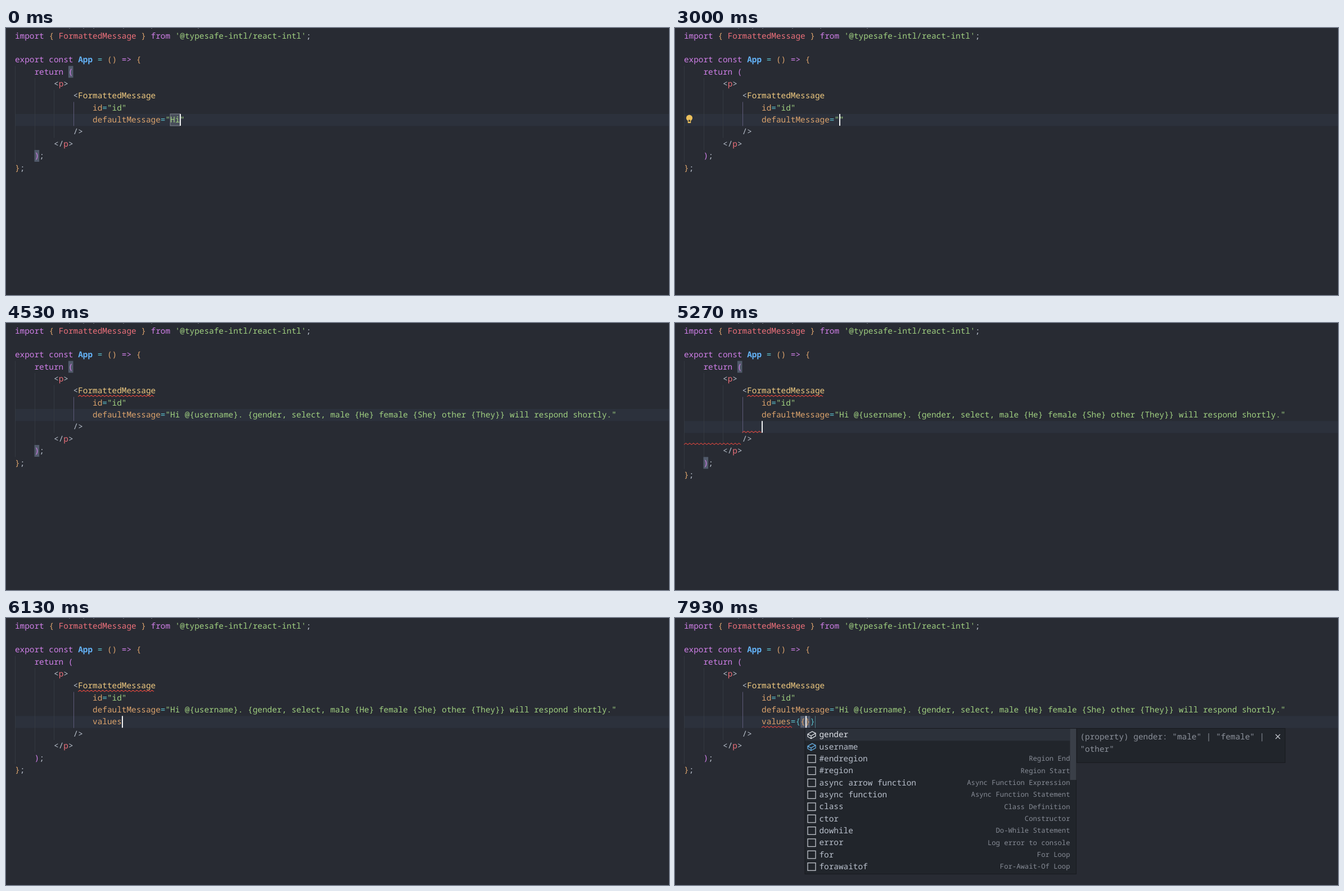
Animation, 1179 px wide and 475 px high, one loop 8 s. Source, as an HTML page:

```html
<!DOCTYPE html>
<html lang="en">
<head>
<meta charset="utf-8">
<title>Typed messages in the editor</title>
<style>
  html, body { margin: 0; width: 100%; height: 100%; overflow: hidden; background: #282b33; }
  svg { display: block; width: 1179px; height: 475px; }
  text {
    font: 500 14.38px "Noto Sans Mono", "DejaVu Sans Mono", monospace;
    white-space: pre;
    text-rendering: geometricPrecision;
    fill: #b9c0cc;
  }
  .keyword { fill: #d07fe8; }
  .red { fill: #ec707a; }
  .orange { fill: #dca36c; }
  .green { fill: #a0d080; }
  .teal { fill: #5bbfcb; }
  .tag { fill: #f0ca80; }
  .func { fill: #64b3f8; font-weight: bold; }
  .bright { fill: #dfe2e8; }
  .detail { fill: #868b95; font-size: 12.22px; text-anchor: end; }
  .doc { fill: #8c919b; }
  .squiggle { fill: none; stroke: #cc443d; stroke-width: 1.1; }
  .icon { fill: none; stroke: #c3c7ce; stroke-width: 1.3; }
  .field { stroke: #64a9dc; }
  .active { stroke: #e4e7ec; }
</style>
</head>
<body>
<svg id="stage" viewBox="0 0 1179 475"></svg>
<script>
const LOOP = 8000, LEFT = 16, TOP = 3.4, CHAR = 8.628, LINE = 21.36, BASE = 15.2;
const MESSAGE = 'Hi @{username}. {gender, select, male {He} female {She} other {They}} will respond shortly.';
const END = 33 + MESSAGE.length;
const TAG_ERROR = [5, 13, 29];

const SNIPPETS = [
  ['#endregion', 'Region End'],
  ['#region', 'Region Start'],
  ['async arrow function', 'Async Function Expression'],
  ['async function', 'Async Function Statement'],
  ['class', 'Class Definition'],
  ['ctor', 'Constructor'],
  ['dowhile', 'Do-While Statement'],
  ['error', 'Log error to console'],
  ['for', 'For Loop'],
  ['forawaitof', 'For-Await-Of Loop'],
];
const PROPS = {
  x: 153.5, thumb: 86, fields: ['values', 'description?', 'key?', 'tagName?'],
  doc: ['(property) values: {', '    username: string;', '} & {',
        '    gender: "male" | "female" | "other…', '}'],
};
const VALUES = {
  x: 231, thumb: 91, fields: ['gender', 'username'],
  doc: ['(property) gender: "male" | "female" |', '"other"'],
};

// Each step changes part of the editor state at the given time.
const steps = [
  [0, { message: 'Hi', values: null, caret: [7, 34], on: true, word: 'match', outer: true,
        inner: false, bulb: false, errors: [], popup: null, doc: false }],
  [470, { on: false }],
  [1000, { on: true }],
  [1470, { on: false }],
  [1600, { caret: [7, 32], on: true, word: 'selected', outer: false }],
  [1870, { bulb: true }],
  [2070, { message: '', word: null }],
  [2530, { on: false }],
  [3000, { on: true }],
  [3200, { message: MESSAGE, caret: [7, END - 1], bulb: false }],
  [3730, { on: false }],
  [4030, { caret: [7, END], on: true, outer: true }],
  [4130, { errors: [TAG_ERROR] }],
  [4530, { on: false }],
  [4930, { values: '', caret: [8, 16], on: true }],
  [5200, { errors: [TAG_ERROR, [8, 12, 16], [9, 0, 12]] }],
  [5400, { popup: PROPS }],
  [5430, { on: false }],
  [5530, { doc: true }],
  [5930, { on: true }],
  [6070, { values: 'values', caret: [8, 22], popup: null, doc: false, outer: false, errors: [TAG_ERROR] }],
  [6470, { values: 'values=', caret: [8, 23] }],
  [6600, { values: 'values={}', caret: [8, 24], inner: true }],
  [6730, { values: 'values={{}}', caret: [8, 25] }],
  [6800, { errors: [[8, 23, 27]] }],
  [7200, { on: false, errors: [[8, 16, 22]] }],
  [7730, { on: true }],
  [7870, { popup: VALUES }],
  [7930, { doc: true }],
];
const states = [];
for (const [, change] of steps) states.push({ ...states.at(-1), ...change });

const colX = col => LEFT + col * CHAR;
const rowY = row => TOP + row * LINE;
const escape = s => s.replace(/&/g, '&amp;').replace(/</g, '&lt;');
const rect = (x, y, w, h, fill, extra = '') =>
  `<rect x="${x}" y="${y}" width="${w}" height="${h}" fill="${fill}" ${extra}/>`;
const text = (x, y, s, cls = '') => `<text x="${x}" y="${y}" class="${cls}">${escape(s)}</text>`;
const cell = (row, col, n, fill, extra) => rect(colX(col), rowY(row), n * CHAR, LINE - .4, fill, extra);
const mark = (row, col) => cell(row, col, 1, '#515a6b');

// A line is an indent followed by pairs of class and text.
function codeLine(row, [col, ...parts]) {
  let out = '';
  for (let i = 0; i < parts.length; i += 2) {
    out += text(colX(col), rowY(row) + BASE, parts[i + 1], parts[i]);
    col += parts[i + 1].length;
  }
  return out;
}

function codeLines({ message, values }) {
  const lines = [
    [0, 'keyword', 'import ', 'orange', '{ ', 'red', 'FormattedMessage', 'orange', ' } ',
      'keyword', 'from ', 'green', "'@typesafe-intl/react-intl'", '', ';'],
    [0],
    [0, 'keyword', 'export const ', 'func', 'App', 'teal', ' = ', 'orange', '() ',
      'keyword', '=> ', 'orange', '{'],
    [4, 'keyword', 'return ('],
    [8, '', '<', 'red', 'p', '', '>'],
    [12, '', '<', 'tag', 'FormattedMessage'],
    [16, 'orange', 'id', 'teal', '=', 'green', '"id"'],
    [16, 'orange', 'defaultMessage', 'teal', '=', 'green', `"${message}"`],
    [12, '', '/>'],
    [8, '', '</', 'red', 'p', '', '>'],
    [4, 'keyword', ')', '', ';'],
    [0, 'orange', '}', '', ';'],
  ];
  if (values !== null) {
    lines.splice(8, 0, [16, 'orange', values.slice(0, 6), 'teal', values.slice(6, 8),
      'orange', values.slice(8, -1), 'teal', values.slice(8).slice(-1)]);
  }
  return lines.map((line, row) => codeLine(row, line)).join('');
}

function guides(extra) {
  const guide = (col, from, to, fill) =>
    rect(Math.round(colX(col)), rowY(from), 1, (to - from) * LINE, fill);
  return guide(0, 3, 11 + extra, '#343941') + guide(4, 4, 10 + extra, '#343941') +
    guide(8, 5, 9 + extra, '#343941') + guide(12, 6, 8 + extra, '#5d5a78');
}

function squiggle([row, from, to]) {
  const waves = Math.round((to - from) * CHAR / 6.74);
  return `<path class="squiggle" d="M${colX(from)} ${rowY(row) + LINE - .6}${'l3.37-2.6 3.37 2.6'.repeat(waves)}"/>`;
}

const bulb = y =>
  `<circle cx="25.5" cy="${y + 7.2}" r="5.6" fill="#ecc05c"/>` +
  rect(22.8, y + 11, 5.4, 5.2, '#ecc05c') + rect(24, y + 10.5, 3, 3.4, '#4a4436');

const cube = (x, y, cls) =>
  `<path class="icon ${cls}" transform="translate(${x} ${y})" d="M-7-1.5 1-6 7-3V2L-1 6.5-7 3ZL-1 1.8 7-3M-1 1.8V6.5"/>`;

function popup({ x, thumb, fields, doc }, showDoc) {
  const top = 197, step = 21.33;
  const border = 'stroke="#181a1f"';
  let out = rect(x, top - .5, 482.5, 259, '#21252b', border) +
    rect(x + .5, top, 471, step, '#2c313a') +
    rect(x + 471.5, top, 11, thumb, '#3a3f48');
  const items = [...fields.map(name => [name, '']), ...SNIPPETS].slice(0, 12);
  items.forEach(([name, detail], i) => {
    const y = top + i * step;
    out += i < fields.length
      ? cube(x + 12, y + 11, i ? 'field' : 'active')
      : `<rect class="icon" x="${x + 5}" y="${y + 4}" width="14" height="13.6"/>`;
    out += text(x + 25.5, y + BASE, name, i ? '' : 'bright') +
      text(x + 471.5, y + BASE - .6, detail, 'detail');
  });
  if (!showDoc) return out;
  const left = x + 483.5, crossX = x + 841, crossY = 211;
  out += rect(left, top - .5, 370.5, doc.length * 21.4 + 18, '#21252b', border);
  doc.forEach((line, i) => out += text(x + 489.5, 216.3 + i * 21.4, line, 'doc'));
  return out + `<path class="icon" d="M${crossX - 4} ${crossY - 4}l8 8m0-8l-8 8"/>`;
}

function draw(s) {
  const extra = s.values === null ? 0 : 1;
  const [row, col] = s.caret;
  let out = [112, 137, 155, 208, 258, 341].map(x => rect(x, 0, 2, 1, '#6b707a')).join('');
  out += rect(LEFT, rowY(row), 1163, LINE, '#2c313c') + guides(extra);
  if (s.outer) out += mark(3, 11) + mark(10 + extra, 4);
  if (s.inner) out += mark(row, col - 1) + mark(row, col) +
    rect(colX(col + (s.values.length > 9 ? 2 : 1)), rowY(row), 1, LINE, '#4b7c86');
  if (s.word === 'match') out += cell(7, 32, 2, '#484e5b', 'stroke="#7f848e"');
  if (s.word === 'selected') out += cell(7, 32, 2, '#434b5c');
  out += codeLines(s) + s.errors.map(squiggle).join('');
  if (s.bulb) out += bulb(rowY(row));
  if (s.on) out += rect(Math.round(colX(col)), rowY(row), 2, LINE - .4, '#f0f1f3');
  if (s.popup) out += popup(s.popup, s.doc);
  return out;
}

const stage = document.getElementById('stage');
let shown = -1;
function tick() {
  const time = performance.now() % LOOP;
  const index = steps.findLastIndex(([start]) => start <= time);
  if (index !== shown) stage.innerHTML = draw(states[shown = index]);
  requestAnimationFrame(tick);
}
tick();
</script>
</body>
</html>
```
